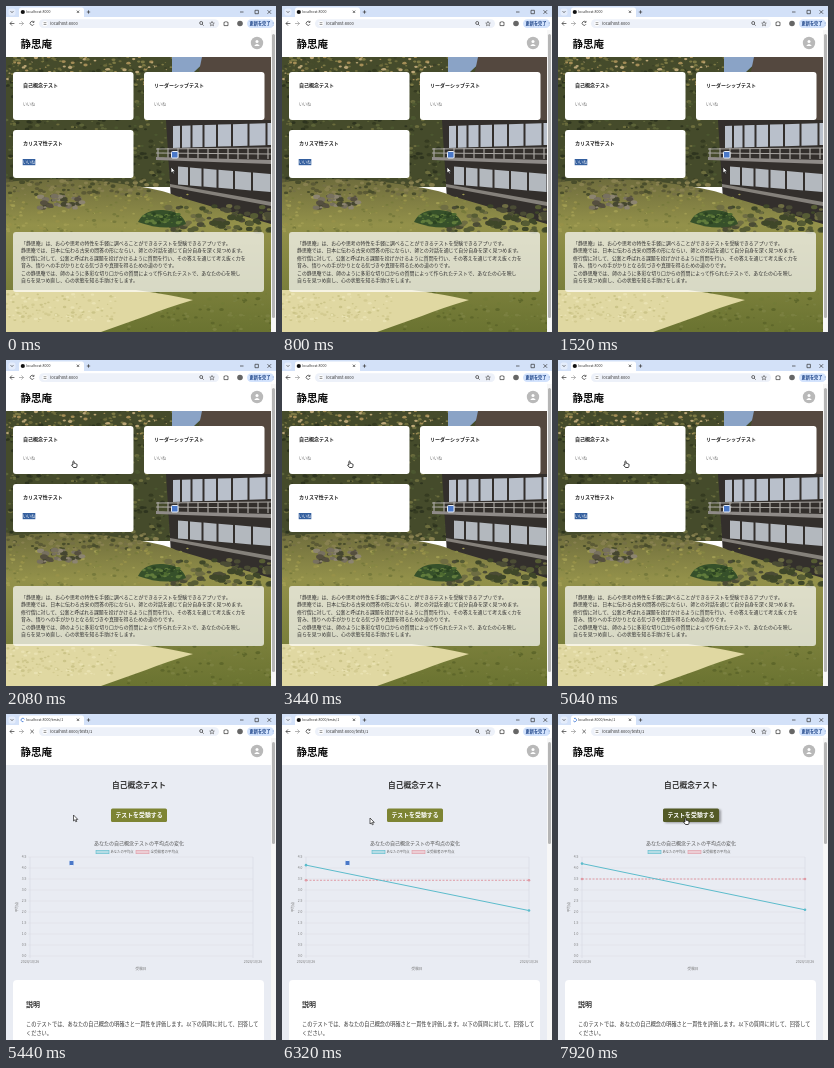
An HTML page for the animation above (8 s loop, 270 px wide and 326 px high).

```html
<!DOCTYPE html>
<html lang="ja">
<head>
<meta charset="utf-8">
<style>
html, body { margin: 0; width: 100%; height: 100%; overflow: hidden; background: #fff }
svg { display: block; width: 270px; height: 326px; font-family: "Noto Sans CJK JP", "Noto Sans CJK", sans-serif }
.b { font-weight: 700 }
.m { text-anchor: middle }
.e { text-anchor: end }
.line { fill: none; stroke: #333; stroke-width: .7 }
</style>
</head>
<body>
<svg viewBox="0 0 270 326">
  <defs>
    <linearGradient id="lawn" x2="0" y2="1"><stop stop-color="#6f6d3d"/><stop offset=".3" stop-color="#93914a"/><stop offset="1" stop-color="#6a7331"/></linearGradient>
    <clipPath id="view"><rect y="51" width="265" height="275"/></clipPath>
    <filter id="shade" x="-20%" y="-30%" width="140%" height="180%"><feDropShadow dy="1" stdDeviation="1" flood-opacity=".35"/></filter>
  </defs>
  <rect width="270" height="326" fill="#fff"/>
  <g id="chrome"></g>
  <g id="home"></g>
  <g id="test"></g>
  <rect id="popup" rx="1" fill="#4a78c8" stroke="#e8eef8"/>
  <g id="arrow"><path d="M0 0V6L1.4 4.8 2.3 6.8 3.3 6.4 2.4 4.4H4.3Z" fill="#fff" stroke="#222" stroke-width=".7"/></g>
  <g id="hand"><path d="M-.6 .5Q0-.4 .6 .5V2.4Q1.2 2 1.6 2.6 2.4 2.3 2.7 2.9 3.5 2.8 3.5 3.6V4.8Q3.4 5.7 2.8 6.5H0L-1.9 4.2Q-1.9 3.3-.6 4Z" fill="#fff" stroke="#111" stroke-width=".8"/></g>
</svg>
<script>
const $ = id => document.getElementById(id);
const text = (x, y, size, s, fill = '#333', cls = '') =>
  `<text x="${x}" y="${y}" font-size="${size}" fill="${fill}" class="${cls}">${s}</text>`;
const rect = (x, y, w, h, fill, r = 0, more = '') =>
  `<rect x="${x}" y="${y}" width="${w}" height="${h}" rx="${r}" fill="${fill}" ${more}/>`;
const circle = (x, y, r, fill) => `<circle cx="${x}" cy="${y}" r="${r}" fill="${fill}"/>`;
const path = (d, fill) => `<path d="${d}" fill="${fill}"/>`;
const line = (d, more = '') => `<path class="line" d="${d}" ${more}/>`;
const scrollbar = height => rect(265, 24, 5, 302, '#f7f7f7') + rect(266, 28, 3, height, '#b5b5b5', 1.5);

let seed = 7;
const rnd = () => (seed = seed * 16807 % 2147483647) / 2147483647;

// Scattered leaves or stones inside a box
function dabs(n, x, y, w, h, size, colors) {
  let s = '';
  for (let i = 0; i < n; i++) {
    const r = size * (.5 + rnd());
    s += `<ellipse cx="${(x + rnd() * w).toFixed(1)}" cy="${(y + rnd() * h).toFixed(1)}" rx="${r.toFixed(1)}" ry="${(r * .65).toFixed(1)}" fill="${colors[i % colors.length]}"/>`;
  }
  return s;
}

// Wall panels between two slanted edges, getting wider to the right
function panels(x, step, top, bottom, slope, fill) {
  let s = '';
  for (; x < 265; x += step, step += 1.5) {
    const w = step - 2, dy = (x - 165) * slope, end = dy + w * slope;
    s += path(`M${x} ${top + dy}L${x + w} ${top + end}V${bottom + end}L${x} ${bottom + dy}Z`, fill);
  }
  return s;
}

function house() {
  let s = path('M166 51H204L188 66H166Z', '#8aa3c6') + path('M196 51H265V118H182Z', '#54483f');
  s += path('M160 114H265V222L165 194Z', '#332f2c');
  s += panels(167, 9, 120, 142, -.03, '#b9c0cb') + panels(172, 12, 160, 178, .08, '#b3b8be');
  const rail = 'style="stroke:#a9a6a2;stroke-width:1.2"';
  s += line('M150 143L265 142M150 147L265 148', rail);
  for (let x = 152; x < 265; x += 10) s += line(`M${x} 142V153`, rail);
  s += path('M150 151L265 154V158L150 154Z', '#8f8b88');
  return s + path('M164 178L265 196V200L164 181Z', '#85817b');
}

function garden() {
  let s = rect(0, 51, 265, 130, '#454b2b');
  s += dabs(500, 0, 64, 172, 115, 1.8, ['#353b21', '#5c6338', '#2e341f', '#6c6d3d', '#4c5730']);
  s += dabs(260, 0, 51, 172, 28, 1.5, ['#a58e57', '#6e6c3c', '#474c2c', '#bca777', '#7d7a45', '#3d4228']);
  s += house();
  s += path('M0 176Q60 170 110 177T170 190L265 218V326H0Z', 'url(#lawn)');
  s += dabs(120, 0, 174, 150, 15, 2, ['#5b5a35', '#757145', '#494d2b', '#87804f']);
  s += dabs(180, 0, 188, 190, 38, 1.5, ['#a09c52', '#868744', '#777a3c', '#979149']);
  s += dabs(45, 34, 190, 42, 12, 2.6, ['#77705f', '#554f3f', '#8c8470', '#454630']);
  s += dabs(90, 160, 200, 105, 26, 3, ['#565c34', '#3f4729', '#6e6d43', '#4b4c35']);
  // Round shrub
  s += path('M132 216Q138 203 157 204T180 218Q160 226 132 216Z', '#36502a');
  s += dabs(50, 138, 207, 38, 10, 1.8, ['#4d6a31', '#2b4322', '#617c3c']);
  // Sunlit ground in front, with the shadow's edge on its right
  s += dabs(220, 0, 286, 265, 40, 1.6, ['#727b37', '#5e672b', '#7a8040']);
  s += path('M0 284H130Q160 288 187 294Q160 302 140 310L95 326H0Z', '#e0d8a2');
  s += dabs(130, 0, 288, 110, 28, 1.4, ['#d3cb91', '#e9e2b2', '#cbc488']);
  return `<g clip-path="url(#view)">${s}</g>`;
}

const card = (x, y, title, picked) =>
  rect(x, y, 120.5, 48, '#fff', 3) + text(x + 10, y + 15, 5, title, '#222', 'b') +
  (picked ? rect(x + 9.7, y + 29, 12.6, 6.2, '#345f9e') : '') +
  text(x + 10, y + 34, 4, 'いいね', picked ? '#fff' : '#666');

const about = [
  '「静思庵」は、お心や思考の特性を手軽に調べることができるテストを受験できるアプリです。',
  '静思庵では、日本に伝わる古来の問答の形にならい、師との対話を通じて自分自身を深く見つめます。',
  '修行僧に対して、公案と呼ばれる課題を投げかけるように質問を行い、その答えを通じて考え抜く力を',
  '育み、悟りへの手がかりとなる気づきや真理を得るための道のりです。',
  'この静思庵では、師のように多彩な切り口からの質問によって作られたテストで、あなたの心を映し',
  '自らを見つめ直し、心の状態を知る手助けをします。'
];
$('home').innerHTML = garden() +
  card(7, 66, '自己概念テスト') + card(138, 66, 'リーダーシップテスト') + card(7, 124, 'カリスマ性テスト', true) +
  rect(7, 226, 251, 60, '#fff', 3, 'opacity=".7"') +
  about.map((s, i) => text(15, 239 + i * 7.4, 4.9, s)).join('') + scrollbar(284);

// Chart scale: 22 px per point, 4.5 at the top
const base = 242, py = v => base - v * 22;
let grid = '';
for (let i = 0; i < 10; i++) {
  const y = py(i / 2);
  grid += line(`M22 ${y}H247`, 'style="stroke:#d8dbe1;stroke-width:.5"') +
    text(20.5, y + 1.3, 3.4, (i / 2).toFixed(1), '#777', 'e');
}
$('test').innerHTML = rect(0, 51, 265, 275, '#e9ecf3') +
  text(133, 74, 7.7, '自己概念テスト', '#333', 'b m') +
  rect(105, 94.5, 56, 13.5, '#7d8433', 1.5, 'id="button"') +
  text(133, 103.4, 5.9, 'テストを受験する', '#fff', 'b m') +
  text(133, 131, 5, 'あなたの自己概念テストの平均点の変化', '#555', 'm') +
  rect(90, 136.3, 13, 3.4, '#b5dce5', 0, 'stroke="#5cbccc" stroke-width=".6"') + text(104.5, 139.3, 3.3, 'あなたの平均点', '#666') +
  rect(130, 136.3, 13, 3.4, '#eccdd4', 0, 'stroke="#e19aa5" stroke-width=".6"') + text(144.5, 139.3, 3.5, '全受験者の平均点', '#666') +
  grid + line('M24 143V244M247 143V244', 'style="stroke:#d3d6dc;stroke-width:.5"') +
  '<g id="plot"></g>' +
  text(24, 249, 3.5, '2024/10/26', '#777', 'm') + text(247, 249, 3.5, '2024/10/26', '#777', 'm') +
  text(135, 256, 3.6, '受験日', '#777', 'm') +
  `<g transform="translate(12 193) rotate(-90)">${text(0, 0, 3.4, '平均点', '#777', 'm')}</g>` +
  rect(7, 266, 251, 70, '#fff', 4) + text(20, 293, 7, '説明', '#333', 'b') +
  text(20, 312, 5.2, 'このテストでは、あなたの自己概念の明確さと一貫性を評価します。以下の質問に対して、回答して') +
  text(20, 321, 5.2, 'ください。') + scrollbar(102);

$('chrome').innerHTML = rect(0, 0, 270, 12, '#d3e1f8') + rect(13, 1.5, 65, 12, '#fff', 2.5) +
  rect(0, 11, 270, 13, '#fff') + rect(2.5, 2.5, 7, 7, '#e5edfb', 2) +
  line('M4.6 5.2L6 6.6 7.4 5.2M70.8 4.6L73.2 7M73.2 4.6L70.8 7M80.8 6H84.2M82.5 4.3V7.7M234 6H237.5M249 4.3H252.4V7.7H249ZM261.5 4.2L265.1 7.8M265.1 4.2L261.5 7.8') +
  '<circle id="icon" cx="16.8" cy="6" r="2.1" fill="#111"/>' +
  '<path id="spinner" d="M16.8 4.3A1.7 1.7 0 1 1 15.1 6" fill="none" stroke="#4179d6" stroke-width=".8"/>' +
  '<text id="tab" x="20" y="7.3" font-size="3.6" fill="#333"></text>' +
  line('M8.4 17.5H4M6 15.4L4 17.5 6 19.6') + line('M13 17.5H17.4M15.4 15.4L17.4 17.5 15.4 19.6', 'opacity=".5"') +
  line('M27.7 16A2 2 0 1 0 28 18.2M28 14.9V16.4H26.5', 'id="reload"') +
  line('M24.4 15.8L27.8 19.2M27.8 15.8L24.4 19.2', 'id="stop"') +
  rect(33, 13.3, 180, 8.6, '#edf1f9', 4.3) + circle(39, 17.6, 2.6, '#fff') +
  line('M37.6 16.7H40.4M37.6 18.5H40.4', 'style="stroke-width:.5"') +
  '<text id="url" x="44" y="19" font-size="4.1" fill="#333"></text>' +
  line('M196.7 17A1.5 1.5 0 1 0 193.7 17 1.5 1.5 0 1 0 196.7 17M196.2 18.2L197.6 19.6') +
  line('M206 15.4L206.7 17 208.3 17.1 207.1 18.2 207.5 19.8 206 18.9 204.5 19.8 204.9 18.2 203.7 17.1 205.3 17Z', 'style="stroke-width:.5"') +
  line('M218 16.2H219.3Q220 14.6 220.7 16.2H222V19.6H218Z') + circle(234, 17.5, 2.8, '#666') +
  rect(241, 13.3, 27, 8.6, '#d3e3fd', 4.3) + text(243.5, 19.1, 4.2, '更新を完了', '#123a80', 'b') + text(265, 19.1, 4.2, '⋮', '#123a80') +
  rect(0, 24, 270, 27, '#fff') + text(14.5, 42, 10.5, '静思庵', '#111', 'b') +
  circle(251, 37, 6.2, '#b9b9b9') + circle(251, 35.5, 1.5, '#fff') + path('M248.2 40Q251 36.2 253.8 40Z', '#fff');

const series = (a, b, color, dash = 'none') =>
  line(`M24 ${a}L247 ${b}`, `style="stroke:${color};stroke-width:1;stroke-dasharray:${dash}"`) +
  circle(24, a, 1.3, color) + circle(247, b, 1.3, color);

// Pointer stops: time, x, y
const route = [[0, 165, 161], [1640, 165, 161], [2080, 67.5, 101], [5840, 67.5, 101], [6240, 88, 104], [6480, 88, 104], [7200, 127.5, 104], [8000, 127.5, 104]];
function pointer(t) {
  const i = route.findIndex(k => k[0] > t);
  const [t0, x0, y0] = route[i - 1], [t1, x1, y1] = route[i];
  const p = (t - t0) / (t1 - t0), e = p * p * (3 - 2 * p);
  return [x0 + (x1 - x0) * e, y0 + (y1 - y0) * e];
}

const show = (id, on) => $(id).style.display = on ? '' : 'none';
const set = (id, attrs) => Object.entries(attrs).forEach(([k, v]) => $(id).setAttribute(k, v));
const LEAVE = 5200, OPEN = 5440, DRAW = 5680, CLICK = 7600;

function draw(now) {
  const t = now % 8000, second = t >= OPEN, [x, y] = pointer(t);
  const loading = t >= CLICK || t >= LEAVE && t < DRAW;
  const overButton = second && x > 105 && x < 161;
  const hand = overButton || !second && x < 127 && y < 114;
  show('home', !second);
  show('test', second);
  show('hand', hand);
  show('arrow', !hand);
  set(hand ? 'hand' : 'arrow', { transform: `translate(${x} ${y})` });

  show('icon', !loading);
  show('reload', !loading);
  show('spinner', loading);
  show('stop', loading);
  set('spinner', { transform: `rotate(${t * .36} 16.8 6)` });
  $('url').textContent = $('tab').textContent = 'localhost:8000' + (second ? '/tests/1' : '');

  show('popup', t < CLICK);
  set('popup', second ? { x: 63, y: 146.5, width: 5, height: 5 } : { x: 165.5, y: 145.5, width: 6.5, height: 6.5 });
  set('button', { fill: overButton ? '#535a28' : '#7d8433', filter: overButton ? 'url(#shade)' : 'none' });

  const p = Math.min(1, Math.max(0, (t - DRAW) / 1000)), grow = 1 - (1 - p) ** 4;
  const at = v => py(v * grow);
  $('plot').innerHTML = t < DRAW ? '' :
    series(at(3.5), at(3.5), '#df9aa4', '2 1.5') + series(at(4.2), at(2.1), '#5cbccc');
}

const start = performance.now();
function loop() {
  draw(performance.now() - start);
  requestAnimationFrame(loop);
}
loop();
</script>
</body>
</html>
```
